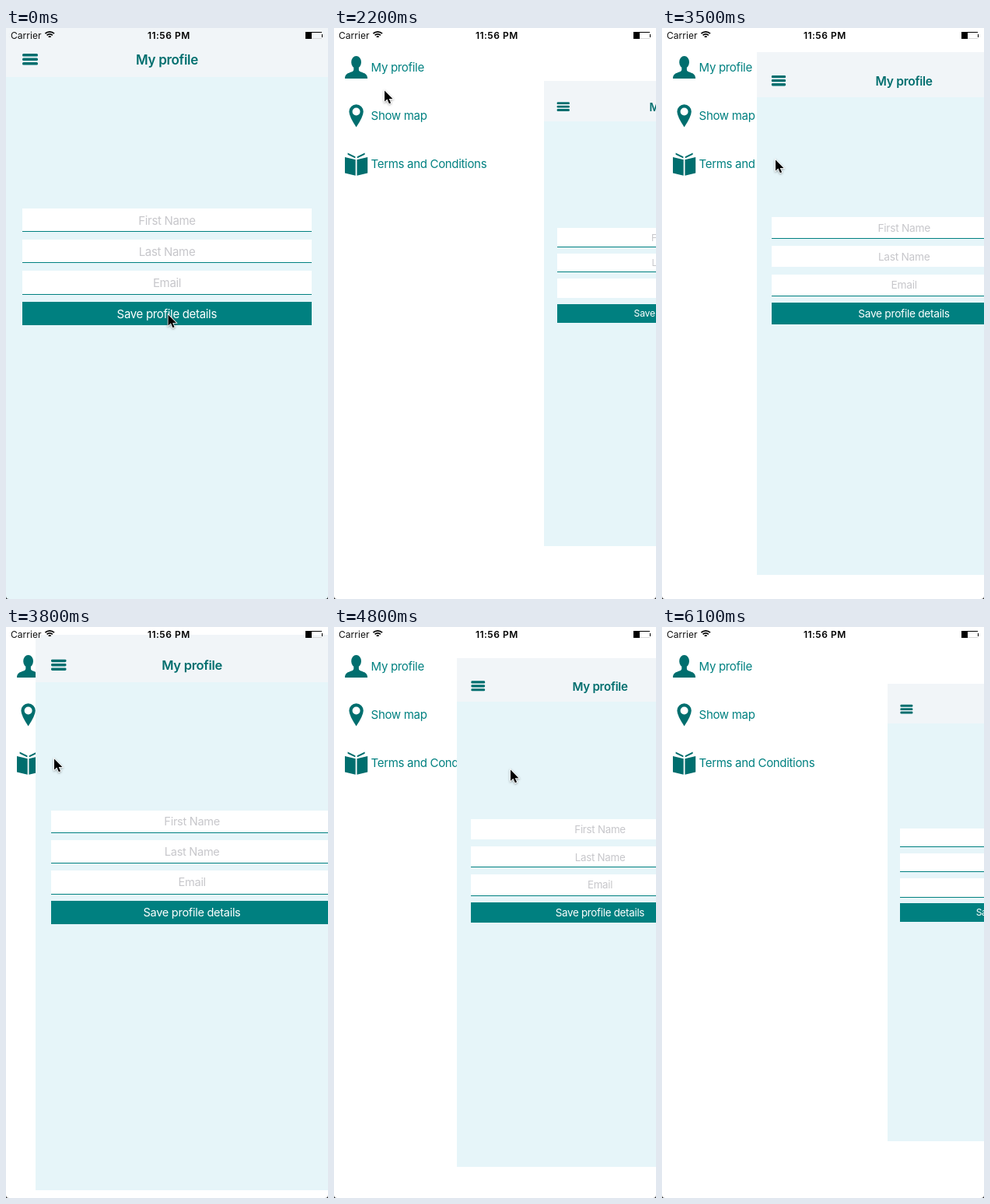
Animation of 414x734 px, one loop 6500 ms. Source, as an HTML page with a canvas:

```html
<!DOCTYPE html>
<html lang="en">
<head>
<meta charset="utf-8">
<title>Side menu</title>
<style>
html, body { margin: 0; width: 100%; height: 100%; overflow: hidden; background: #fff; }
canvas { display: block; width: 414px; height: 734px; }
</style>
</head>
<body>
<canvas id="stage"></canvas>
<script>
const W = 414, H = 734, MID = H / 2;
const LOOP = 6500, STEP = 100;
const OPEN = 289.6, SHRINK = 0.2 / OPEN;
const TAP = 1850, GRAB = 2900, DROP = 3800, REGRAB = 4280, FLING = 4880, LEAVE = 5300;
const TEAL = '#008080', DARK = '#006e6e';
const FONT = 'Inter, "Liberation Sans", sans-serif';

const canvas = document.getElementById('stage');
const ctx = canvas.getContext('2d');
const dpr = window.devicePixelRatio || 1;
canvas.width = W * dpr;
canvas.height = H * dpr;

// Pointer stops; equal neighbours are rests
const stops = [
  { t: 450, x: 208.5, y: 368 },
  { t: 700, x: 241, y: 250 },
  { t: 1100, x: 47, y: 54 },
  { t: 1500, x: 34, y: 40 },
  { t: TAP, x: 34, y: 40 },
  { t: 2200, x: 65, y: 80 },
  { t: 2800, x: 314, y: 169 },
  { t: GRAB, x: 314, y: 169 },
  { t: DROP, x: 62, y: 169 },
  { t: REGRAB, x: 60, y: 169 },
  { t: 4400, x: 98, y: 169 },
  { t: FLING, x: 252.8, y: 186 },
  { t: LEAVE, x: 252.8, y: 186 },
  { t: 5600, x: 425, y: -24 }
];

const clamp = v => Math.max(0, Math.min(1, v));
const mix = (a, b, p) => a + (b - a) * p;
const easeOut = v => 1 - Math.pow(1 - clamp(v), 3);

function pointer(t) {
  const i = Math.max(1, stops.findIndex(s => s.t > t));
  const a = stops[i - 1], b = stops[i];
  const p = clamp((t - a.t) / (b.t - a.t));
  return { x: mix(a.x, b.x, p), y: mix(a.y, b.y, p) };
}

const dragShut = t => pointer(t).x - 24.45;
const dragOpen = t => Math.max(0, pointer(t).x * 0.985 - 66);

// Left edge of the page: tap opens, first drag shuts, second drag opens
function pageX(t) {
  if (t < GRAB) return OPEN * easeOut((t - TAP) / 594);
  if (t < DROP) return dragShut(t);
  if (t < REGRAB) return mix(dragShut(DROP), 0, easeOut((t - DROP) / 250));
  if (t < FLING) return dragOpen(t);
  return mix(dragOpen(FLING), OPEN, easeOut((t - FLING) / 450));
}

function rect(x, y, w, h, color) {
  ctx.fillStyle = color;
  ctx.fillRect(x, y, w, h);
}

function text(str, x, y, size, color, o = {}) {
  ctx.font = `${o.weight || 400} ${size}px ${FONT}`;
  ctx.letterSpacing = `${o.track ?? -0.32}px`;
  ctx.textAlign = o.align || 'left';
  ctx.fillStyle = color;
  ctx.fillText(str, x, y);
}

function trace(points) {
  ctx.beginPath();
  points.forEach(([x, y]) => ctx.lineTo(x, y));
  ctx.closePath();
}

function person(x, y) {
  ctx.beginPath();
  ctx.ellipse(x, y - 7, 6.4, 8, 0, 0, Math.PI * 2);
  ctx.rect(x - 3.3, y - 2, 6.6, 8);
  ctx.fill();
  ctx.beginPath();
  ctx.moveTo(x - 3.3, y + 3);
  ctx.bezierCurveTo(x - 4, y + 7, x - 14.5, y + 5, x - 14.5, y + 14);
  ctx.lineTo(x + 14.5, y + 14);
  ctx.bezierCurveTo(x + 14.5, y + 5, x + 4, y + 7, x + 3.3, y + 3);
  ctx.fill();
}

function pin(x, y) {
  ctx.beginPath();
  ctx.arc(x, y - 5.5, 9.2, Math.PI, 0);
  ctx.quadraticCurveTo(x + 9, y + 1, x, y + 14.5);
  ctx.quadraticCurveTo(x - 9, y + 1, x - 9.2, y - 5.5);
  ctx.moveTo(x + 5, y - 5.5);
  ctx.arc(x, y - 5.5, 5, 0, Math.PI * 2);
  ctx.fill('evenodd');
}

function book(x, y) {
  const sheet = (side, inner, outer, top, drop, h) => {
    trace([[x + side * inner, y + top + drop], [x + side * outer, y + top],
      [x + side * outer, y + top + h], [x + side * inner, y + top + drop + h]]);
    ctx.fill();
  };
  for (const side of [-1, 1]) {
    sheet(side, 0.9, 14.6, -9, 3.2, 20.5);
    sheet(side, 1.2, 11, -14.5, 4.8, 2.2);
  }
}

function menu() {
  const items = [['My profile', person], ['Show map', pin], ['Terms and Conditions', book]];
  items.forEach(([label, icon], i) => {
    const y = 50 + 62 * i;
    ctx.fillStyle = DARK;
    icon(28.6, y + 1);
    text(label, 47.6, y + 5.5, 15, TEAL);
  });
}

function page(x) {
  const s = 1 - SHRINK * x;
  const px = v => Math.round(x + v * s);
  const py = v => Math.round(MID + (v - MID) * s);
  // Edges snap to whole pixels, so thin lines vanish at some scales
  const box = (l, t, r, b, color) =>
    rect(px(l), py(t), px(r) - px(l), py(b) - py(t), color);

  box(0, 0, W, H, '#e6f5f9');
  box(0, 0, W, 63, '#f1f5f8');
  box(0, 63.07, W, 63.4, '#a4afb0');

  const fields = ['First Name', 'Last Name', 'Email'];
  const bottom = i => 262 + 40.5 * i - (i % 2) / 2;
  fields.forEach((_, i) => {
    box(21, 232 + 40 * i, 393, bottom(i), '#fff');
    box(21, bottom(i) - 0.92, 393, bottom(i), TEAL);
  });
  box(21, 352, 393, 382, TEAL);

  ctx.save();
  ctx.translate(x, MID * (1 - s));
  ctx.scale(s, s);
  ctx.fillStyle = DARK;
  for (let i = 0; i < 3; i++) {
    ctx.beginPath();
    ctx.roundRect(21, 33 + 5.5 * i, 20, 3.6, 1.5);
    ctx.fill();
  }
  text('My profile', 207, 47, 17, DARK, { weight: 600, align: 'center' });
  fields.forEach((label, i) =>
    text(label, 207, 252.5 + 40 * i, 15, '#c7c7cb', { align: 'center' }));
  text('Save profile details', 206.8, 372.5, 15, '#fff', { align: 'center' });
  ctx.restore();
}

function statusBar() {
  text('Carrier', 6, 14, 12, '#111', { track: 0.05 });
  text('11:56 PM', 209.3, 14, 12, '#000', { weight: 600, align: 'center', track: 0.5 });

  ctx.strokeStyle = '#000';
  ctx.lineWidth = 1.7;
  for (let r = 8.2; r > 0; r -= 3.1) {
    ctx.beginPath();
    ctx.arc(56.2, 13, r, -Math.PI * 0.75, -Math.PI * 0.25);
    ctx.stroke();
  }

  rect(385, 5, 8, 9, '#000');
  rect(393, 5, 13, 1, '#000');
  rect(393, 13, 13, 1, '#d8d8d8');
  rect(406, 8, 1, 4, '#000');
}

function arrow({ x, y }) {
  ctx.save();
  ctx.translate(x, y);
  trace([[0, 0.4], [0, 14.6], [3.4, 11.6], [5.9, 17.2], [8.1, 16.2], [5.7, 11], [10.4, 11]]);
  ctx.shadowColor = 'rgba(0,0,0,.4)';
  ctx.shadowBlur = 3 * dpr;
  ctx.shadowOffsetY = dpr;
  ctx.strokeStyle = '#fff';
  ctx.lineWidth = 1.6;
  ctx.stroke();
  ctx.shadowColor = 'transparent';
  ctx.fillStyle = '#000';
  ctx.fill();
  ctx.restore();
}

function corners() {
  ctx.fillStyle = '#111';
  for (const [x, dir] of [[0, 1], [W, -1]]) {
    ctx.beginPath();
    ctx.moveTo(x, H - 3.5);
    ctx.quadraticCurveTo(x, H, x + dir * 3.5, H);
    ctx.lineTo(x, H);
    ctx.fill();
  }
}

function draw(t) {
  ctx.setTransform(dpr, 0, 0, dpr, 0, 0);
  rect(0, 0, W, H, '#fff');
  menu();
  page(pageX(t));
  statusBar();
  if (t < 5600) arrow(pointer(t));
  corners();
}

const start = performance.now();
function tick() {
  const t = (performance.now() - start) % LOOP;
  draw(Math.floor(t / STEP) * STEP);
  requestAnimationFrame(tick);
}
tick();
</script>
</body>
</html>
```
